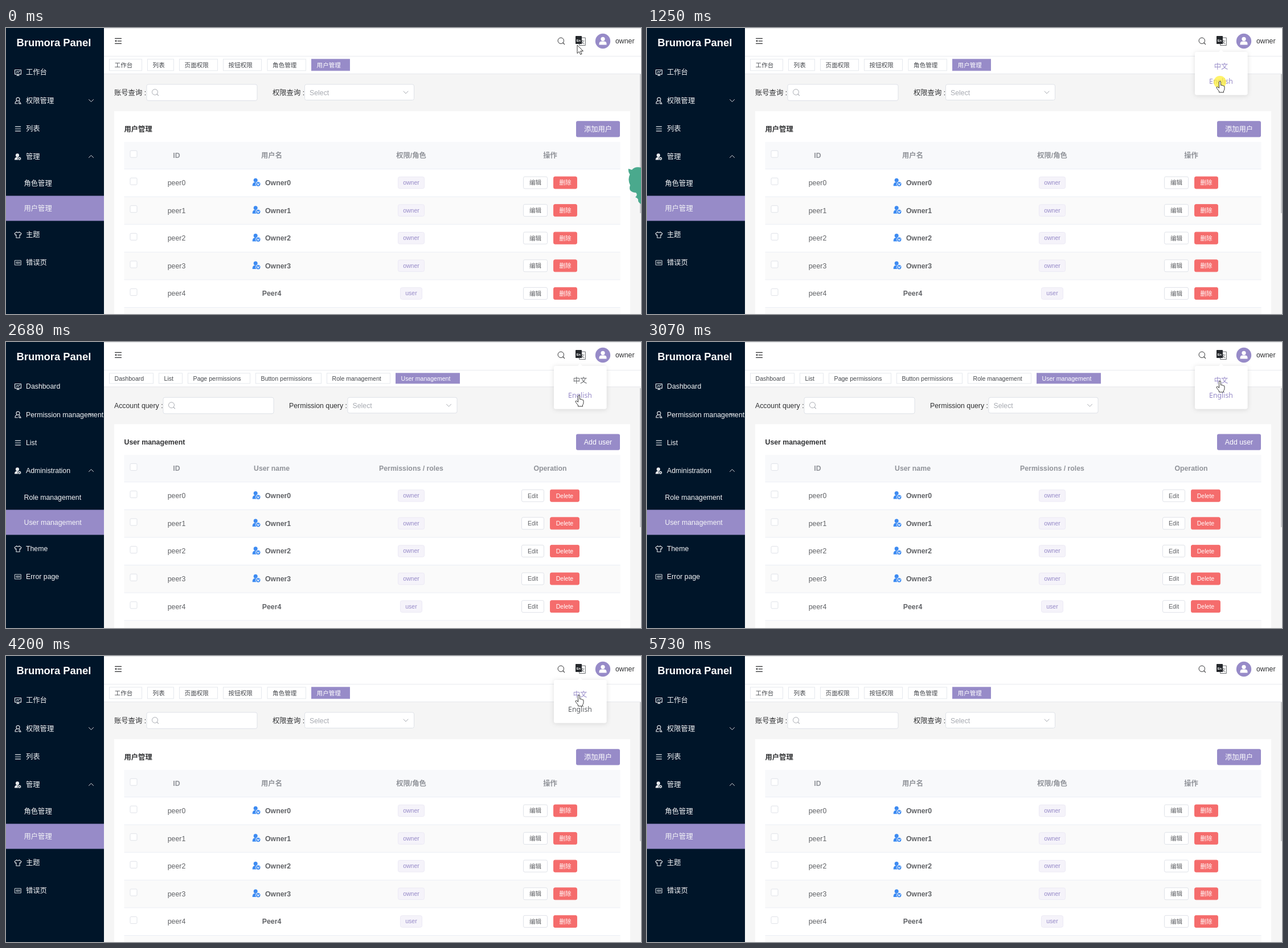
An HTML page for the animation above (6.28 s loop, 1115x502 px).

```html
<!DOCTYPE html>
<html lang="en">
<head>
<meta charset="utf-8">
<title>User management</title>
<style>
  html, body { margin: 0; width: 100%; height: 100%; overflow: hidden; background: #fff; }
  svg { display: block; width: 100vw; height: 100vh; }
  text { font-family: "Liberation Sans", "Noto Sans CJK SC", "Noto Sans CJK", sans-serif; white-space: pre; }
  .menu { font-family: "Noto Sans", "Noto Sans CJK SC", "Noto Sans CJK", sans-serif; }
</style>
</head>
<body>
<svg id="stage" viewBox="0 0 1115 502" preserveAspectRatio="none"></svg>
<script>
const LOOP = 6280;
const PURPLE = '#978bc8', NAVY = '#001529', RED = '#f56c6c';
const INK = '#303133', TEXT = '#606266', MUTED = '#909399', BORDER = '#dcdfe6';
const MD = 12.32, SM = 10.56;

const LANGS = {
  zh: {
    menu: ['工作台', '权限管理', '列表', '管理', '角色管理', '用户管理', '主题', '错误页'],
    tabs: [['工作台', 181, 239], ['列表', 248, 295], ['页面权限', 304, 372],
           ['按钮权限', 381, 449], ['角色管理', 458.5, 527], ['用户管理', 536, 604]],
    tabH: 21, dy: 0,
    account: '账号查询 :', inputX: 246.5,
    permission: '权限查询 :', permissionX: 468, selectX: 524,
    title: '用户管理', add: '添加用户',
    head: ['ID', '用户名', '权限/角色', '操作'],
    edit: ['编辑', 908, 951], del: ['删除', 961, 1003]
  },
  en: {
    menu: ['Dashboard', 'Permission management', 'List', 'Administration',
           'Role management', 'User management', 'Theme', 'Error page'],
    tabs: [['Dashboard', 181, 259], ['List', 268, 310], ['Page permissions', 319, 429],
           ['Button permissions', 438, 554], ['Role management', 563, 675], ['User management', 684, 797]],
    tabH: 19, dy: -1.75,
    account: 'Account query :', inputX: 275.5,
    permission: 'Permission query :', permissionX: 497, selectX: 599.5,
    title: 'User management', add: 'Add user',
    head: ['ID', 'User name', 'Permissions / roles', 'Operation'],
    edit: ['Edit', 905, 945], del: ['Delete', 955, 1007]
  }
};
const MENU_Y = [78, 127.5, 177, 226, 272.5, 316.5, 363, 412];
const COLS = [299.5, 466.5, 711.5, 955.5];
const ROW_TOP = 247.5, ROW_H = 48.6;

const rect = (x, y, w, h, fill, more = '') =>
  `<rect x="${x}" y="${y}" width="${w}" height="${h}" fill="${fill}" ${more}/>`;
const box = (x, y, w, h, fill, stroke, r = 3) =>
  rect(x + .5, y + .5, w - 1, h - 1, fill, `stroke="${stroke}" stroke-width=".9" rx="${r}"`);
// y is the middle of the capital letters
const label = (s, x, y, size, fill, more = '') =>
  `<text x="${x}" y="${y + size * .36}" font-size="${size}" fill="${fill}" ${more}>${s}</text>`;
const mid = (s, x, y, size, fill, more = '') =>
  label(s, x, y, size, fill, 'text-anchor="middle" ' + more);
const line = (d, color, w = 1, more = '') =>
  `<path d="${d}" fill="none" stroke="${color}" stroke-width="${w}" stroke-linecap="round" stroke-linejoin="round" ${more}/>`;
const shape = (d, fill, more = '') => `<path d="${d}" fill="${fill}" ${more}/>`;
const dot = (x, y, r, fill, more = '') => `<circle cx="${x}" cy="${y}" r="${r}" fill="${fill}" ${more}/>`;
const at = (x, y, body) => `<g transform="translate(${x} ${y})">${body}</g>`;
const BOLD = 'font-weight="bold"';

const glass = (x, y, r, color) => at(x, y,
  dot(0, 0, r, 'none', `stroke="${color}"`) + line(`M${r * .72} ${r * .72}l${r * .5} ${r * .5}`, color, 1.1));
const chevron = (x, y, up, color) =>
  line(`M${x - 4} ${y + (up ? 2 : -2)}l4 ${up ? -4 : 4}l4 ${up ? 4 : -4}`, color);

function icons() {
  const c = '#e8eaed';
  return at(21, 78, line('M-5.5-4.5h11v7.6h-11zM-2 5.4h4M0 3.2v2M-3 0l2-1.6 1.6 1.4 2.6-2.4', c, 1.1)) +
    at(21, 127.5, dot(0, -2.4, 3, 'none', `stroke="${c}" stroke-width="1.1"`) +
      line('M-2 .6C-4.4 1.4-5 3-5 5.3h4.4M2 .6l3 4.7M1 3.4l1.4 2h2.8', c, 1.1)) +
    at(21, 177, line('M-4.6-3.8h9.2M-4.6 0h9.2M-4.6 3.8h9.2', c, 1.2)) +
    at(20.5, 226, dot(-.5, -2.6, 3.1, c) + shape('M-5.5 5.6c0-3.6 1.8-5.1 5-5.1 2 0 3 .6 3 .6v4.5z', c) +
      dot(3.2, 3.2, 3, c, `stroke="${NAVY}" stroke-width=".8"`) + dot(3.2, 3.2, 1, NAVY)) +
    at(21, 363, line('M-2.3-5L-6-2.4l1.5 3 1.5-.7v5.4h6v-5.4l1.5.7 1.5-3L2.3-5Q0-2.6-2.3-5z', c, 1.1)) +
    at(21, 412, line('M-5.3-4h10.6v8h-10.6z', c, .9) + mid('404', 0, .3, 4.8, c, BOLD));
}

function header() {
  return rect(172, 0, 943, 50, '#fff') + rect(172, 0, 943, 1, '#e4e5e7') +
    line('M191.5 18.3h11M196 22.8h6.5M191.5 27.3h11', INK, 1.2, 'stroke-linecap="butt"') +
    shape('M191 22.8l3-2v4z', INK) +
    glass(974.3, 22.3, 5.2, INK) +
    line('M1007 17h10.3v13.5h-10.3z', '#55585c', .9) +
    mid('文', 1012.5, 24.2, 6.5, '#33363a') +
    rect(1000, 14, 11, 14, '#25282c', 'rx=".8"') + mid('En', 1005.4, 21.5, 5.8, '#fff', BOLD) +
    dot(1048, 23, 13.2, PURPLE) + dot(1048, 19.3, 3.6, '#fff') +
    shape('M1041.5 29.5v-1.6c0-3 1.8-4.3 4-4.3h5c2.200 0 4 1.300 4 4.300v1.600z', '#fff') +
    label('owner', 1070, 23, MD, INK);
}

const userIcon = y => at(439, y,
  dot(-.8, -3.8, 3.5, '#3d8bf2') +
  shape('M-6.300 6.200c0-4.500 1.500-6.500 5.600-6.500 2.500 0 4 1 4 1v5.500z', '#3d8bf2') +
  dot(3.8, 3, 4.2, '#3d8bf2', 'stroke="#fff" stroke-width=".9"') +
  line('M2 1.800l1.700 2.800 1.900-2.800', '#fff', 1.1));

const check = y => box(217.5, y - 6.5, 13, 13, '#fff', BORDER, 1.8);

function button([s, x0, x1], y, fill, stroke, color) {
  return box(x0, y - 11, x1 - x0, 22, fill, stroke, 2.5) + mid(s, (x0 + x1) / 2, y, SM, color);
}

function row(i, L) {
  const y = ROW_TOP + ROW_H * i + 24;
  const owner = i < 4, w = owner ? 47 : 39;
  return check(y - 2.3) +
    mid('peer' + i, COLS[0], y, MD, TEXT) +
    (owner ? userIcon(y - .5) + label('Owner' + i, 455, y, MD, TEXT, BOLD)
           : mid('Peer' + i, COLS[1], y, MD, TEXT, BOLD)) +
    box(COLS[2] - w / 2, y - 10.700, w, 21.500, '#f5f3fa', '#eae8f4') +
    mid(owner ? 'owner' : 'user', COLS[2], y - .3, SM, PURPLE) +
    button(L.edit, y, '#fff', BORDER, TEXT) +
    button(L.del, y, RED, RED, '#fff');
}

function page(L) {
  let s = '';
  L.menu.forEach((m, i) => {
    const sub = i === 4 || i === 5;
    s += label(m, sub ? 31.5 : 35, MENU_Y[i], MD, '#f4f5f7');
  });
  const barEnd = 80.5 + L.dy;
  s += rect(172, 50, 943, barEnd - 50, '#fff') + rect(172, 49, 943, 1, '#e9ebef') +
    rect(172, barEnd, 943, 502, '#f5f5f5') + rect(172, barEnd - .5, 943, 1, '#e6e8ec');
  L.tabs.forEach(([name, x0, x1], i) => {
    const on = i === 5;
    s += box(x0, 54.3, x1 - x0, L.tabH, on ? PURPLE : '#fff', on ? PURPLE : '#e3e6ec', 0) +
      label(name, x0 + 9.6, 54.5 + L.tabH / 2, SM, on ? '#fff' : '#45484d');
  });

  let c = label(L.account, 190, 113.5, MD, INK) +
    box(L.inputX, 98.5, 195, 29.5, '#fff', BORDER) +
    glass(L.inputX + 15, 112.500, 5, '#a8abb2') +
    label(L.permission, L.permissionX, 113.5, MD, INK) +
    box(L.selectX, 98.5, 193, 28.5, '#fff', BORDER) +
    label('Select', L.selectX + 9, 113.5, MD, '#a8abb2') +
    chevron(L.selectX + 178, 113, false, '#a8abb2') +
    rect(190, 146, 906, 380, '#fff') +
    label(L.title, 207.5, 177.8, MD, INK, BOLD) +
    rect(1001, 163.3, 77, 28.3, PURPLE, 'rx="3"') +
    mid(L.add, 1039.5, 177.5, MD, '#fff') +
    rect(207.5, 200, 871, 47.5, '#f8f9fb');
  for (let i = 0; i < 6; i++) {
    const y = ROW_TOP + ROW_H * i;
    c += rect(207.5, y, 871, ROW_H, i % 2 ? '#fafafa' : '#fff', `class="r${i}"`) +
      rect(207.5, y - .5, 871, 1, '#ebeef5');
  }
  c += check(221.2);
  L.head.forEach((h, i) => c += mid(h, COLS[i], 223.300, MD, MUTED, BOLD));
  for (let i = 0; i < 5; i++) c += row(i, L);
  return s + at(0, L.dy, c) + rect(1113, 81, 2, 244, '#c9cacd');
}

const popup =
  `<g filter="url(#shadow)">${rect(962, 42, 92.500, 75.500, '#fff', 'rx="3.5"')}</g>` +
  shape('M1003 43l5-5 5 5z', '#fff') +
  mid('中文', 1008, 67.5, MD, PURPLE, 'id="zhItem" class="menu"') +
  mid('English', 1008, 93.5, MD, TEXT, 'id="enItem" class="menu"');

const arrow = shape('M0 0V14.500L3.400 11.400 5.700 16.500 8 15.500 5.800 10.500H10.400z', '#fff',
  'stroke="#222" stroke-width=".9" stroke-linejoin="round"');
const hand = shape('M-1.500 1Q-1.500-.5 0-.5T1.500 1V6.500Q3.300 5.500 4 7 5.600 6.200 6.200 7.800 8 7.200 8 9.300' +
  'V12.500Q8 15 6.500 16.500V19H-1.500V17Q-3.500 14.500-5.800 11.300-6.500 9.500-4.800 9.300-3 9.500-1.500 11.500z', '#fff',
  'stroke="#222" stroke-width=".9" stroke-linejoin="round"');

const mascot = shape('M1115 245C1108 243 1102 245 1099 249L1093 247Q1092 252 1095.500 257' +
  'Q1091 266 1096 276Q1094 281 1096 285Q1100 289 1106 289Q1110 293 1105 297Q1111 299 1110 304' +
  'Q1112 308 1115 309z', '#4aa98d');

document.getElementById('stage').innerHTML =
  `<defs><filter id="shadow" x="-30%" y="-30%" width="160%" height="160%">
    <feDropShadow dx="0" dy="1" stdDeviation="4.500" flood-color="#000" flood-opacity=".13"/></filter></defs>` +
  rect(0, 0, 1115, 502, '#fff') + header() +
  rect(0, 0, 172, 502, NAVY) + rect(0, 294.5, 172, 44, PURPLE) +
  mid('Brumora Panel', 84, 25, 18.4, '#fff', BOLD) + icons() +
  chevron(149.500, 127.5, false, '#d5d8dc') + chevron(149.500, 225.5, true, '#d5d8dc') +
  `<g id="zh">${page(LANGS.zh)}</g><g id="en">${page(LANGS.en)}</g>` +
  `<g id="mascot">${mascot}</g><g id="popup">${popup}</g>` +
  dot(1006, 0, 11, '#ffee32', 'id="click" opacity=".72"') +
  `<g id="cursor"><g id="arrow">${arrow}</g><g id="hand">${hand}</g></g>`;

const $ = id => document.getElementById(id);
const parts = {};
for (const id of ['zh', 'en', 'mascot', 'popup', 'click', 'cursor', 'arrow', 'hand', 'zhItem', 'enItem'])
  parts[id] = $(id);
const rows = [0, 1, 2, 3, 4, 5].map(i => parts.zh.querySelector('.r' + i));

const clamp = v => Math.max(0, Math.min(1, v));
const smooth = v => v * v * (3 - 2 * v);
const ramp = (t, a, b) => smooth(clamp((t - a) / (b - a)));
const show = (node, on) => node.setAttribute('display', on ? 'inline' : 'none');

// time, x, y of the pointer tip
const PATH = [[70, 1003, 30], [350, 1002.500, 20], [580, 1002.500, 20], [1050, 1006, 94],
  [2680, 1006, 94], [3070, 1006, 69], [4930, 1006, 69], [5590, 1030, 364], [5730, 1032, 510]];

function pointer(t) {
  const i = PATH.findIndex(p => p[0] > t);
  if (i === 0) return PATH[0].slice(1);
  if (i < 0) return PATH[PATH.length - 1].slice(1);
  const [t0, x0, y0] = PATH[i - 1], [t1, x1, y1] = PATH[i];
  const k = (t - t0) / (t1 - t0);
  const e = t0 < 4930 ? smooth(k) : t0 < 5590 ? k * k : k;
  return [x0 + (x1 - x0) * e, y0 + (y1 - y0) * e];
}

function draw(t) {
  const english = t >= 1520 && t < 4200;
  show(parts.zh, !english);
  show(parts.en, english);

  const [x, y] = pointer(t);
  const open = ramp(t, 120, 350) * (1 - ramp(t, 5270, 5570));
  const overMenu = open > .5 && y > 50 && y < 117;
  show(parts.cursor, t < 5730);
  parts.cursor.setAttribute('transform', `translate(${x} ${y})`);
  show(parts.hand, overMenu);
  show(parts.arrow, !overMenu);

  show(parts.popup, open > 0);
  parts.popup.setAttribute('opacity', open);
  parts.popup.setAttribute('transform', `translate(0 ${42 * (1 - open)}) scale(1 ${open})`);
  const overZh = overMenu && y > 55 && y < 80, overEn = overMenu && y >= 80 && y < 107;
  parts.zhItem.setAttribute('fill', !english || overZh ? PURPLE : TEXT);
  parts.enItem.setAttribute('fill', english || overEn ? PURPLE : TEXT);

  const first = t >= 1250 && t < 1520, second = t >= 3940 && t < 4200;
  show(parts.click, first || second);
  parts.click.setAttribute('cy', first ? 95 : 67.5);

  show(parts.mascot, t < 1190);
  const squash = 1 - .045 * (1 - Math.cos(Math.PI * t / 580));
  parts.mascot.setAttribute('transform', `translate(0 ${244 * (1 - squash)}) scale(1 ${squash})`);

  const hover = t > 4990 && t < 5730 ? Math.floor((y - ROW_TOP) / ROW_H) : -1;
  rows.forEach((r, i) => r.setAttribute('fill', i === hover ? '#f5f7fa' : i % 2 ? '#fafafa' : '#fff'));
}

const start = performance.now();
function tick() {
  draw((performance.now() - start) % LOOP);
  requestAnimationFrame(tick);
}
tick();
</script>
</body>
</html>
```
